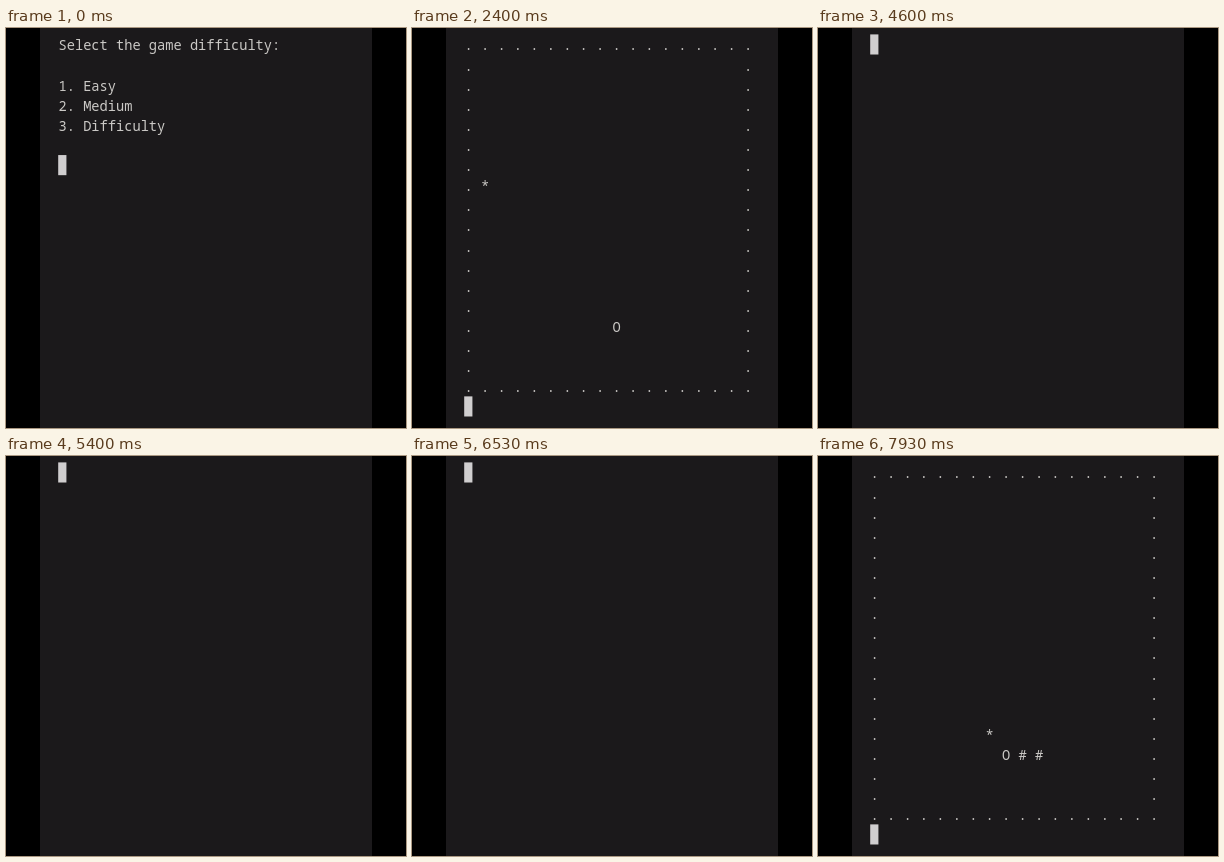
An HTML page with a canvas for the animation above (8 s loop, 400 by 400 pixels).

```html
<!DOCTYPE html>
<html lang="en">
<head>
<meta charset="utf-8">
<title>Terminal snake</title>
<style>
  html, body { margin: 0; width: 100%; height: 100%; overflow: hidden; background: #000; }
  canvas { display: block; }
</style>
</head>
<body>
<canvas id="stage" width="400" height="400"></canvas>
<script>
const ctx = document.getElementById('stage').getContext('2d');
const LOOP = 8000, TICKS_PER_MS = 0.015;
const LEFT = 52.5, TOP = 6.4, CHAR = 8.22, LINE = 20.11;
const SIZE = 16;           // playable cells per side
const GAME_START = 28, KEY_PRESSED = 21;
const MENU = ['Select the game difficulty:', '', '1. Easy', '2. Medium', '3. Difficulty'];
const FOOD = [[1, 7], [14, 14], [7, 13]];
const DIRS = { R: [1, 0], L: [-1, 0], U: [0, -1], D: [0, 1] };

// One letter per redraw; a dot keeps the snake in place.
const MOVES = 'RRR' + 'RRDRUU' + 'U'.repeat(6) + 'R'.repeat(5) + '.' + 'D'.repeat(7) + 'L'.repeat(9);

const wrap = v => (v - 1 + SIZE) % SIZE + 1;

function snakeAt(step) {
  const trail = [[6, 14]];
  let eaten = 0;
  for (const m of MOVES.slice(0, step)) {
    if (m === '.') continue;
    const [dx, dy] = DIRS[m];
    const [x, y] = trail[0];
    const head = [wrap(x + dx), wrap(y + dy)];
    trail.unshift(head);
    if (head[0] === FOOD[eaten][0] && head[1] === FOOD[eaten][1]) eaten++;
  }
  return { body: trail.slice(0, eaten + 1), food: FOOD[eaten] };
}

function print(text, col, row) {
  ctx.fillText(text, LEFT + col * CHAR, TOP + row * LINE + 16);
}

function cursor(col, row) {
  ctx.fillStyle = '#d0cecf';
  ctx.fillRect(LEFT + col * CHAR - 0.3, TOP + row * LINE, CHAR, LINE);
}

function drawMenu(typed) {
  MENU.forEach((line, row) => print(line, 0, row));
  print(typed, 0, 6);
  cursor(typed.length, 6);
}

function drawBoard(step) {
  const end = SIZE + 1;
  for (let i = 0; i <= end; i++) {
    print('.', i * 2, 0);
    print('.', i * 2, end);
    if (i > 0 && i < end) {
      print('.', 0, i);
      print('.', end * 2, i);
    }
  }
  const { body, food } = snakeAt(step);
  print('*', food[0] * 2, food[1]);
  body.forEach(([x, y], i) => print(i ? '#' : 'O', x * 2, y));
  cursor(0, end + 1);
}

function draw(ms) {
  const tick = Math.floor(ms * TICKS_PER_MS + 0.1);
  ctx.fillStyle = '#000';
  ctx.fillRect(0, 0, 400, 400);
  ctx.fillStyle = '#1b191b';
  ctx.fillRect(34, 0, 332, 400);
  ctx.fillStyle = '#cbc9c6';
  ctx.font = '13.7px "Noto Sans Mono", monospace';

  if (tick < GAME_START) {
    drawMenu(tick < KEY_PRESSED ? '' : '1');
    return;
  }
  // Each cycle shows the board, then a cleared screen.
  const cycle = (tick - 36) / 2.42 - 0.74;
  const n = Math.floor(cycle);
  if (cycle - n > 0.76) cursor(0, 0);
  else drawBoard(n + 4);
}

const start = performance.now();
function frame() {
  draw((performance.now() - start) % LOOP);
  requestAnimationFrame(frame);
}
frame();
</script>
</body>
</html>
```
